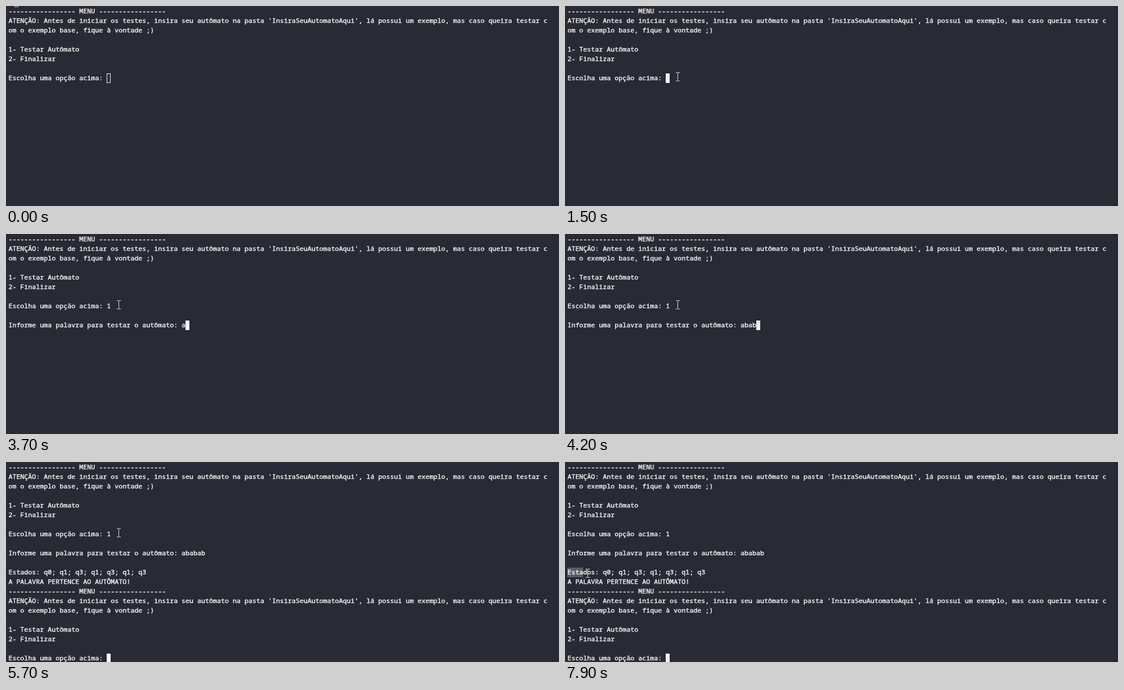
Animation of 983x356 px, one loop 8 s. Source, as an HTML page:

```html
<!DOCTYPE html>
<html lang="pt">
<head>
<meta charset="utf-8">
<title>Terminal</title>
<style>
  html, body { margin: 0; width: 100%; height: 100%; overflow: hidden; background: #282a36; }
  svg { display: block; }
  text {
    font: 11.6667px "Noto Sans Mono", "DejaVu Sans Mono", monospace;
    fill: #f8f8f2; stroke: #f8f8f2; stroke-width: 0.4px; white-space: pre;
  }
  rect, path { shape-rendering: crispEdges; }
</style>
</head>
<body>
<svg width="983" height="356" viewBox="0 0 983 356">
  <rect id="selection" x="4" y="188" width="28" height="17" fill="#5b5d68"/>
  <g id="lines"></g>
  <rect id="caret" stroke="#f8f8f2"/>
  <path id="mouse" fill="#e4e4e4" d="M-3-8h3v1h-3zM1-8h3v1h-3zM0-7h1v14h-1zM-3 7h3v1h-3zM1 7h3v1h-3z"/>
</svg>
<script>
const LOOP = 8000, STEP = 100;
const LEFT = 4, TOP = 1, CHAR = 7, ROW = 17, BASELINE = 12, ROWS = 21;
const $ = id => document.getElementById(id);
const dashes = '-'.repeat(17);

const menu = [
  `${dashes} MENU ${dashes}`,
  "ATENÇÃO: Antes de iniciar os testes, insira seu autômato na pasta 'InsiraSeuAutomatoAqui', lá possui um exemplo, mas caso queira testar c",
  'om o exemplo base, fique à vontade ;)',
  '',
  '1- Testar Autômato',
  '2- Finalizar',
  '',
  'Escolha uma opção acima: '
];
const word = 'ababab';
const keyTimes = [3700, 3800, 3900, 4200, 4900, 5000];

// Pointer moves: first step, last step, destination
const moves = [
  [200, 600, 203, 122],
  [1000, 1100, 200, 126],
  [6300, 6300, 184, 142],
  [6600, 7000, 10, 198],
  [7200, 7200, 9, 199],
  [7900, 7900, 40, 198]
];

const lines = Array.from({ length: ROWS }, (_, row) => {
  const line = document.createElementNS('http://www.w3.org/2000/svg', 'text');
  line.setAttribute('x', LEFT + 0.4);
  line.setAttribute('y', TOP + row * ROW + BASELINE);
  return $('lines').appendChild(line);
});

function screenText(t) {
  const rows = [...menu];
  if (t >= 2300) rows[7] += '1';
  if (t >= 2600) {
    const typed = keyTimes.filter(time => t >= time).length;
    rows.push('', 'Informe uma palavra para testar o autômato: ' + word.slice(0, typed));
  }
  if (t >= 5700) {
    rows.push('', 'Estados: q0; q1; q3; q1; q3; q1; q3', 'A PALAVRA PERTENCE AO AUTÔMATO!', ...menu);
  }
  return rows;
}

function pointer(t) {
  let x = 18, y = -6;
  for (const [start, end, toX, toY] of moves) {
    if (t < start) break;
    const steps = (end - start) / STEP + 1;
    const p = Math.min(1, (Math.floor((t - start) / STEP) + 1) / steps);
    const eased = p * (2 - p);
    x += (toX - x) * eased;
    y += (toY - y) * eased;
  }
  return [Math.round(x), Math.round(y)];
}

function setAttributes(element, attributes) {
  for (const name in attributes) element.setAttribute(name, attributes[name]);
}

function render(t) {
  const rows = screenText(t);
  lines.forEach((line, i) => {
    const content = rows[i] || '';
    if (line.textContent !== content) line.textContent = content;
  });
  const last = rows.length - 1;
  setAttributes($('caret'), {
    x: LEFT + rows[last].length * CHAR + 0.5,
    y: TOP + last * ROW + 0.5,
    width: CHAR - 1,
    height: ROW - 1,
    fill: t < 1500 ? 'none' : '#f8f8f2'
  });
  setAttributes($('selection'), { visibility: t >= 7900 ? 'visible' : 'hidden' });
  setAttributes($('mouse'), { transform: `translate(${pointer(t)})` });
}

const startTime = performance.now();
function tick() {
  render((performance.now() - startTime) % LOOP);
  requestAnimationFrame(tick);
}
tick();
</script>
</body>
</html>
```
